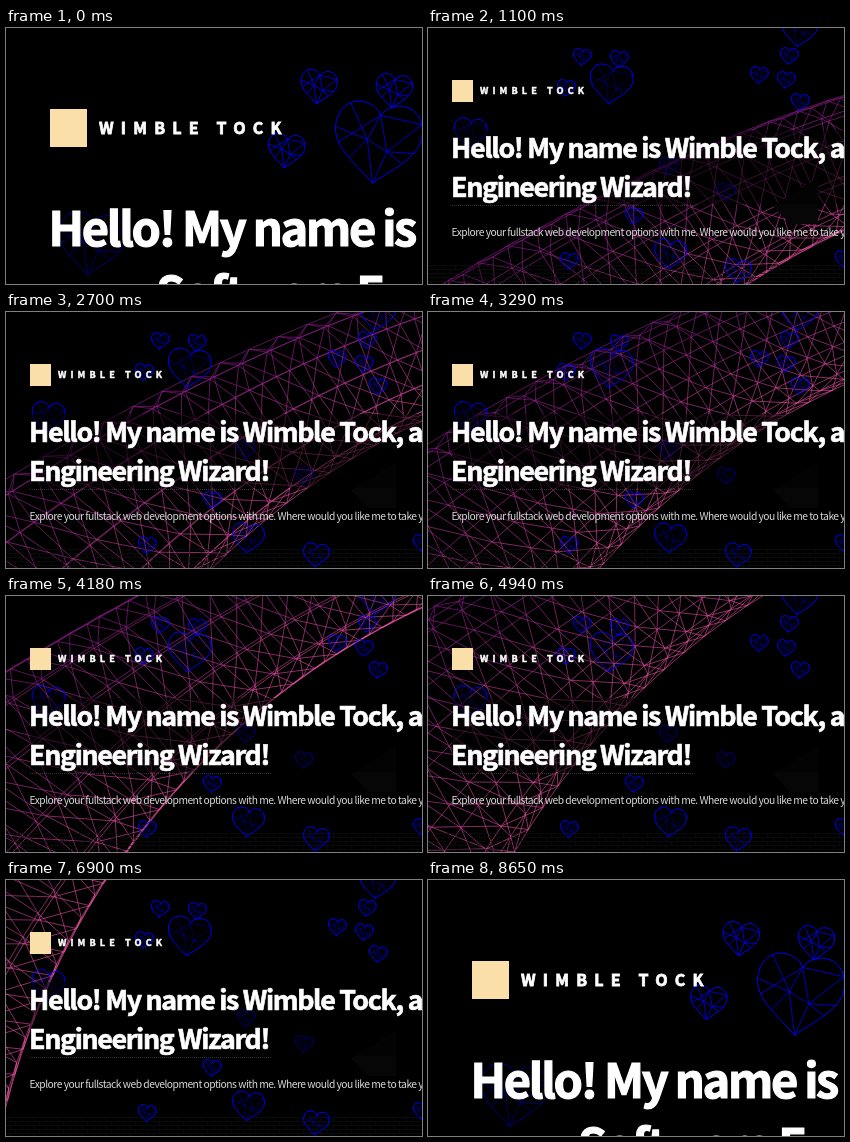
Animation of 416x256 px, one loop 8730 ms. Source, as an HTML page with a canvas:

```html
<!DOCTYPE html>
<html lang="en">
<head>
<meta charset="utf-8">
<title>Wireframe tunnel hero</title>
<style>
  html, body { margin: 0; width: 100%; height: 100%; overflow: hidden; background: #000; }
  canvas, svg { position: absolute; left: 0; top: 0; width: 416px; height: 256px; }
  text { font-family: "Noto Sans CJK JP", "Noto Sans CJK SC", "Noto Sans CJK", "Open Sans", sans-serif; fill: #fff; white-space: pre; }
  .title { font-weight: 900; font-size: 26.8px; letter-spacing: -.05em; stroke: #fff; stroke-width: .7; }
  .brand { font-weight: 900; font-size: 9.15px; letter-spacing: 4.1px; stroke: #fff; stroke-width: .5; }
  .lead { font-size: 10.3px; letter-spacing: -.05em; fill: #d8d8d8; }
  .close .title { font-size: 47px; stroke-width: 1.2; }
  .close .brand { font-size: 16px; letter-spacing: 7.2px; stroke-width: .8; }
  #hearts { fill: none; stroke: #00f; }
  #hearts path { vector-effect: non-scaling-stroke; stroke-width: .95; }
  #hearts .facets { stroke-width: .3; }
  #hearts.near .facets { stroke-width: .75; }
  .shade { opacity: .5; }
  .logo { fill: #fbdfa8; }
</style>
</head>
<body>
<canvas id="tunnel" width="416" height="256"></canvas>
<svg viewBox="0 0 416 256">
  <defs>
    <pattern id="bricks" width="12" height="8" patternUnits="userSpaceOnUse" y="237">
      <path d="M0 .5H12M0 4.5H12M3.5 0V4M9.5 4V8" fill="none" stroke="#111"/>
    </pattern>
  </defs>
  <g id="scenery">
    <path d="M345 178L390 150V196H362Z" fill="#060606"/>
    <rect y="237" width="416" height="19" fill="url(#bricks)" opacity=".6"/>
  </g>
  <g id="hearts"></g>
  <g id="wide">
    <rect class="shade" x="24" y="102" width="392" height="74"/>
    <rect class="logo" x="24" y="52" width="21" height="22"/>
    <text class="brand" x="52" y="66">WIMBLE TOCK</text>
    <text class="title" x="23" y="130">Hello! My name is Wimble Tock, a Software</text>
    <text class="title" x="23" y="169">Engineering Wizard!</text>
    <path d="M24 177.5H265" stroke="#333" stroke-dasharray="1 1"/>
    <text class="lead" x="23.5" y="208">Explore your fullstack web development options with me. Where would you like me to take you?</text>
  </g>
  <g id="close" class="close">
    <rect class="shade" x="44" y="181" width="372" height="75"/>
    <rect class="logo" x="44" y="81" width="37" height="38"/>
    <text class="brand" x="93" y="105.5">WIMBLE TOCK</text>
    <text class="title" x="42.5" y="218">Hello! My name is</text>
    <text class="title" x="150" y="283">Software E</text>
  </g>
</svg>
<script>
const LOOP = 8730, CUT_IN = 80, CUT_OUT = 8650, ENTER = 7890, EXIT = 7700;
const byId = id => document.getElementById(id);
const ctx = byId('tunnel').getContext('2d');

// Wire heart in a unit box; small ones share one size
const OUTLINE = 'M0-.33C-.1-.54-.5-.55-.5-.13C-.48.14-.2.3 0 .5C.2.3.48.14.5-.13C.5-.55.1-.54 0-.33Z';
const FACETS = 'M0-.33L-.12-.02L-.5-.13M-.12-.02L-.36-.44M-.3.22L-.12-.02L0 .5L.12.1L-.12-.02' +
  'M0-.33L.12.1L.48-.28L0-.33M.44.08L.12.1L.3.22M0-.33L-.44.05';
const addHeart = (x, y, size = 18) => {
  byId('hearts').innerHTML += `<g transform="translate(${x} ${y}) rotate(7) scale(${size} ${size * .93})">
    <path d="${OUTLINE}"/><path class="facets" d="${FACETS}"/></g>`;
};
for (const [x, y] of [[154, 29], [191, 31], [138, 60], [361, 28], [331, 47], [358, 52],
  [372, 74], [240, 138], [298, 164], [206, 188], [141, 233], [416, 231]]) addHeart(x, y);
addHeart(183, 56, 43);
addHeart(371, 2, 36);
addHeart(42, 105, 33);
addHeart(242, 226, 32);
addHeart(310, 243, 26);

// The tunnel is part of a great ring whose centre rises faster and faster
const CENTER_X = 735, RADIUS = 750, SIDES = 12, STEP = .035;
const centerY = time =>
  36.6 * Math.max(0, EXIT - time) ** .36 + 130 * Math.exp((ENTER - LOOP - time) / 900);

function drawTunnel(time) {
  const cy = centerY(time), spin = time / 5200, drift = time / 30000 % STEP;
  const depth = side => (1 + Math.cos(side / SIDES * Math.PI * 2 + spin)) / 2;
  const point = (ring, side) => {
    const tilt = .03 * Math.sin(side / SIDES * Math.PI * 2 + spin);
    const angle = ring * STEP + drift + tilt;
    const r = RADIUS + (120 + 140 * angle ** 3) * depth(side);
    return [CENTER_X - r * Math.sin(angle), cy - r * Math.cos(angle)];
  };
  ctx.lineWidth = .6;
  for (let side = 0; side < SIDES; side++) {
    const v = 1 - depth(side + .5);
    ctx.strokeStyle = `rgb(${145 + 95 * v}, ${28 + 56 * v}, ${145 + 20 * v})`;
    ctx.beginPath();
    for (let ring = 7; ring * STEP < 1.9; ring++) {
      const corner = point(ring + 1, side);
      ctx.moveTo(...corner);
      ctx.lineTo(...point(ring, side));
      ctx.lineTo(...point(ring, side + 1));
      ctx.lineTo(...corner);
    }
    ctx.stroke();
  }
}

function frame(now) {
  const time = now % LOOP;
  const close = time < CUT_IN || time >= CUT_OUT;
  byId('wide').style.display = byId('scenery').style.display = close ? 'none' : '';
  byId('close').style.display = close ? '' : 'none';
  byId('hearts').setAttribute('class', close ? 'near' : '');
  byId('hearts').setAttribute('transform', close ? 'matrix(2.03 0 0 2.06 0 -1)' : '');
  ctx.clearRect(0, 0, 416, 256);
  if (!close && (time < EXIT || time >= ENTER)) drawTunnel(time >= ENTER ? time - LOOP : time);
}

const start = performance.now();
(function tick() {
  frame(performance.now() - start);
  requestAnimationFrame(tick);
})();
</script>
</body>
</html>
```
